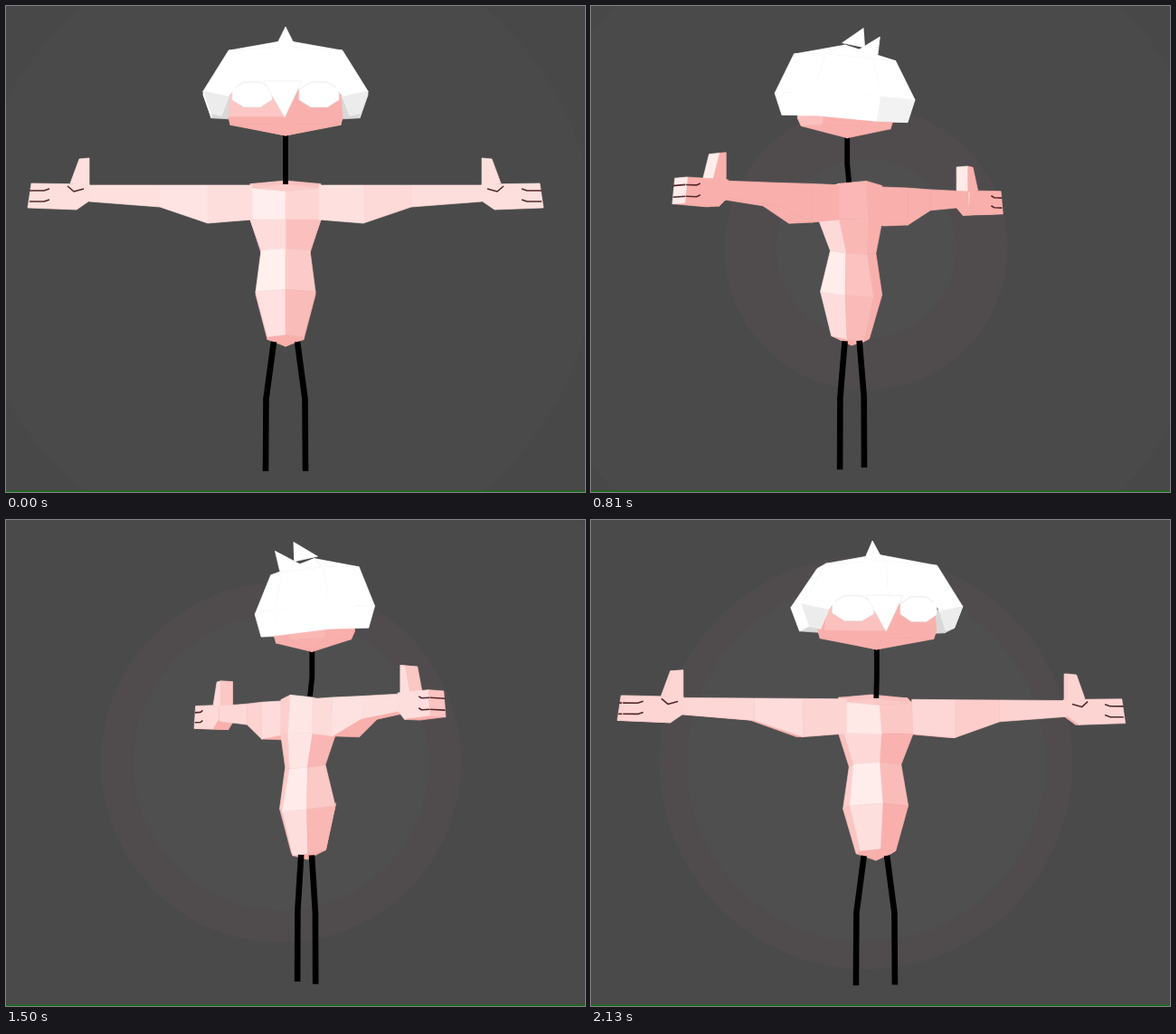
Write an HTML page that moves like this. It is 640x537 px and loops after 2160 ms.

```html
<!DOCTYPE html>
<html lang="en">
<head>
<meta charset="utf-8">
<title>Turntable figure</title>
<style>
html, body { margin: 0; width: 100%; height: 100%; overflow: hidden; background: #494949; }
svg { display: block; width: 100vw; height: 100vh; }
</style>
</head>
<body>
<svg viewBox="0 0 640 537" preserveAspectRatio="none">
  <rect width="640" height="537" fill="#484848"/>
  <circle id="outer" cx="306" cy="268" fill="#4a4a4a"/>
  <circle id="ring" cx="304" cy="268" fill="#504c4d"/>
  <circle id="inner" cx="304" cy="268" fill="#4f4f4f"/>
  <g id="figure" stroke-linejoin="round"></g>
  <rect y="535.6" width="640" height="1.4" fill="#14701a"/>
</svg>
<script>
const LOOP = 2160, STEP = 30;
const AXIS = 309, HORIZON = 268, DISTANCE = 3000, PITCH = 0.012;
const byId = id => document.getElementById(id);
const clamp = v => Math.min(1, Math.max(0, v));

// A steady turn that eases in slightly behind a full circle
const turn = t => t / 6 - 7 * (1 - Math.exp(-t / 140));
const glowRadius = t => 102 * (t / 270) ** 0.39;
const innerRadius = t => 128 * (Math.max(0, t - 570) / 480) ** 0.37;

// Model point from its place in the front view plus its depth
function pt([x, y, z]) {
  const s = DISTANCE / (DISTANCE - z);
  return [x / s, (y - HORIZON + PITCH * z) / s, z];
}

function projector(angle) {
  const c = Math.cos(angle), s = Math.sin(angle);
  return ([x, y, z]) => {
    const depth = x * s + z * c;
    const k = DISTANCE / (DISTANCE - depth);
    return [AXIS + (x * c - z * s) * k, HORIZON + y * k - PITCH * depth, depth];
  };
}

function normal(points) {
  const n = [0, 0, 0];
  points.forEach((a, i) => {
    const b = points[(i + 1) % points.length];
    for (let k = 0; k < 3; k++) {
      const u = (k + 1) % 3, v = (k + 2) % 3;
      n[k] += a[u] * b[v] - a[v] * b[u];
    }
  });
  const length = Math.hypot(...n) || 1;
  return n.map(v => v / length);
}

// Quads between two rings of equal size
const band = (a, b) => a.map((p, i) => {
  const j = (i + 1) % a.length;
  return [p, a[j], b[j], b[i]].map(pt);
});
const skinOver = rings => rings.slice(1).flatMap((ring, i) => band(rings[i], ring));
const endCap = ring => ring.map(pt);
const prism = (outline, back, front) => {
  const [a, b] = [back, front].map(z => outline.map(([x, y]) => [x, y, z]));
  return [...band(a, b), endCap([...a].reverse()), endCap(b)];
};

// Six-sided cross-section whose height changes by `drop` from front to back
function hexRing(y, w, front, back, drop = 0) {
  const at = (x, f, lean) => [x, y + drop * lean, front + (back - front) * f];
  return [at(-w, 0.27, 0.3), at(0, 0, 0), at(w, 0.27, 0.3),
          at(w, 0.8, 0.7), at(0, 1, 1), at(-w, 0.8, 0.7)];
}
const tip = (y, z) => Array(6).fill([0, y, z]);
function armRing(x, bottom) {
  const top = 198, half = (bottom - top) * 0.4;
  return [[x, bottom, 30 + half], [x, top, 30 + half], [x, top, 30 - half], [x, bottom, 30 - half]];
}

const flip = points => points.map(([x, y, z]) => [-x, y, z]).reverse();
const bothSides = faces => [...faces, ...faces.map(flip)];

const torso = skinOver([
  tip(197, 24),
  hexRing(205, 39, 46, 6, -12),
  hexRing(236, 39, 57, 3),
  hexRing(268, 27, 47, 5, 7),
  hexRing(313, 33, 63, -4, 9),
  hexRing(363, 20, 51, 9, 8),
  tip(376, 27)
]);
const arm = skinOver([armRing(37, 236), armRing(86, 240), armRing(139, 222), armRing(217, 216)]);

const BACK = 21, FRONT = 40;
const hand = prism([[217, 197], [281, 196], [285, 223], [231, 225], [215, 214]], BACK, FRONT);
const thumb = prism([[217, 168], [228, 169], [238, 196], [217, 199]], BACK + 3, FRONT - 1);
const creases = [202, 214].flatMap(y => [
  ...[FRONT, BACK].map(z => [[261, y, z], [267, y + 2, z], [283, y + 2, z]]),
  [[284, y + 2, FRONT], [284, y + 2, BACK]]
]).concat([[[223, 202, FRONT], [234, 205, FRONT], [241, 199, FRONT]]])
  .map(line => line.map(pt));

const limb = (faces, marks = []) => [
  { faces, marks, side: 1 },
  { faces: faces.map(flip), marks: marks.map(flip), side: -1 }
];
const parts = [{ faces: torso, marks: [] }, ...limb(arm), ...limb(hand, creases), ...limb(thumb)];

const skull = skinOver([
  hexRing(84, 60, 76, 0),
  hexRing(122, 63, 72, 3),
  hexRing(130, 61, 66, 7, 2),
  tip(143, 33)
]);
const crown = hexRing(45, 63, 82, -4, 14);
const brim = hexRing(91, 91, 92, -14, 10);
const hem = hexRing(114, 82, 86, -8, 14);
const hairTop = skinOver([tip(38, 36), crown, brim]);
const hairHem = band(brim, hem).slice(2);

const lock = [brim[0], [-52, 84, 74], [-63, 100, 72], [-71, 121, 67], hem[0]].map(pt);
const locks = bothSides([lock]);
const lockTips = bothSides([[lock[0], ...lock.slice(2)]]);
const eyes = bothSides([Array.from({ length: 8 }, (_, i) => {
  const a = (i + 0.5) * Math.PI / 4, x = 37 + 24 * Math.cos(a);
  return pt([x, 98 + 15 * Math.sin(a), 90 - 0.28 * x]);
})]);
const bang = [[-24, 83, 85], [18, 83, 85], [-1, 123, 85]].map(pt);

function spike(y, z, lead, tail) {
  const apex = [0, y, z], front = [0, y + 12, lead], back = [0, y + 20, tail];
  const [left, right] = [-10, 10].map(x => [x, y + 20, tail + 4]);
  return [[apex, left, front], [apex, front, right], [apex, back, left], [apex, right, back]]
    .map(face => face.map(pt));
}
const spikes = [...spike(36, -13, 22, -6), ...spike(23, 10, 40, 12)];

const legs = [-1, 1].map(side => [[13, 371], [21.5, 434], [22, 514]].map(([x, y]) => pt([side * x, y, 26])));
const neck = [[0, 140, 33], [0, 172, 33], [0, 197, 30]].map(pt);

const DARK = [249, 176, 173], LIGHT = [255, 240, 239];
const rgb = channels => `rgb(${channels.map(Math.round)})`;

function skin(n, dim = 0) {
  const lit = clamp((-0.45 * n[0] - 0.35 * n[1] + 0.82 * n[2] - 0.3) / 0.7 - dim);
  return rgb(DARK.map((v, k) => v + (LIGHT[k] - v) * lit));
}
const face = n => skin(n, 0.5);
const white = () => "#fff";
function hair(n) {
  const v = 255 - 90 * Math.max(0, 0.6 * n[0] + n[1] - 0.6);
  return rgb([v, v, v]);
}

const coords = points => points.map(p => p[0].toFixed(1) + "," + p[1].toFixed(1)).join(" ");
const polygon = (points, fill, edge = fill) =>
  `<polygon points="${coords(points)}" fill="${fill}" stroke="${edge}" stroke-width=".7"/>`;
const stroke = (points, color, width) =>
  `<polyline points="${coords(points)}" fill="none" stroke="${color}" stroke-width="${width}"/>`;
const depthOf = points => points.reduce((sum, p) => sum + p[2], 0) / points.length;

function drawFigure(angle) {
  const project = projector(angle), facing = Math.cos(angle), sideways = Math.sin(angle);
  const view = faces => faces.map(f => {
    const points = f.map(project);
    return { points, n: normal(points), depth: depthOf(points) };
  });
  const paint = (faces, shade, edge) => view(faces)
    .filter(f => f.n[2] > 0.001)
    .sort((a, b) => a.depth - b.depth)
    .map(f => polygon(f.points, shade(f.n), edge)).join("");

  // A crease shows when the side of the hand it lies on faces the viewer
  const shows = (line, side) => {
    const a = line[0][2], b = line[line.length - 1][2];
    const toward = a !== b ? side * sideways : a === FRONT ? facing : -facing;
    return toward > 0.15;
  };
  const paintPart = ({ faces, marks, side }) => paint(faces, skin) + marks
    .filter(line => shows(line, side))
    .map(line => stroke(line.map(project), "#54282b", 1.6)).join("");

  const body = parts
    .map(part => ({ part, depth: depthOf(part.faces.flat().map(project)) }))
    .sort((a, b) => a.depth - b.depth)
    .map(({ part }) => paintPart(part)).join("");
  const throat = stroke(neck.map(project), "#000", 5.8);
  const stand = legs.map(leg => stroke(leg.map(project), "#000", 6.6)).join("");
  const lining = view(hairHem).filter(f => f.n[2] < 0)
    .map(f => polygon(f.points, "#d9d9d9")).join("");
  const head = lining + paint(skull, face) + paint(spikes, white)
    + paint([...hairTop, ...hairHem], hair) + paint(eyes, white, "#e3dede")
    + paint(locks, white) + paint(lockTips, () => "#ececec")
    + paint([bang], white, "#f0eded");

  return (facing > 0 ? body + throat : throat + body) + stand + head;
}

function draw(t) {
  byId("outer").setAttribute("r", 347 + t * 0.05);
  byId("ring").setAttribute("r", glowRadius(t));
  byId("inner").setAttribute("r", innerRadius(t));
  byId("figure").innerHTML = drawFigure(turn(t) * Math.PI / 180);
}

const start = performance.now();
function tick() {
  const t = (performance.now() - start) % LOOP;
  draw(Math.floor(t / STEP) * STEP);
  requestAnimationFrame(tick);
}
tick();
</script>
</body>
</html>
```
